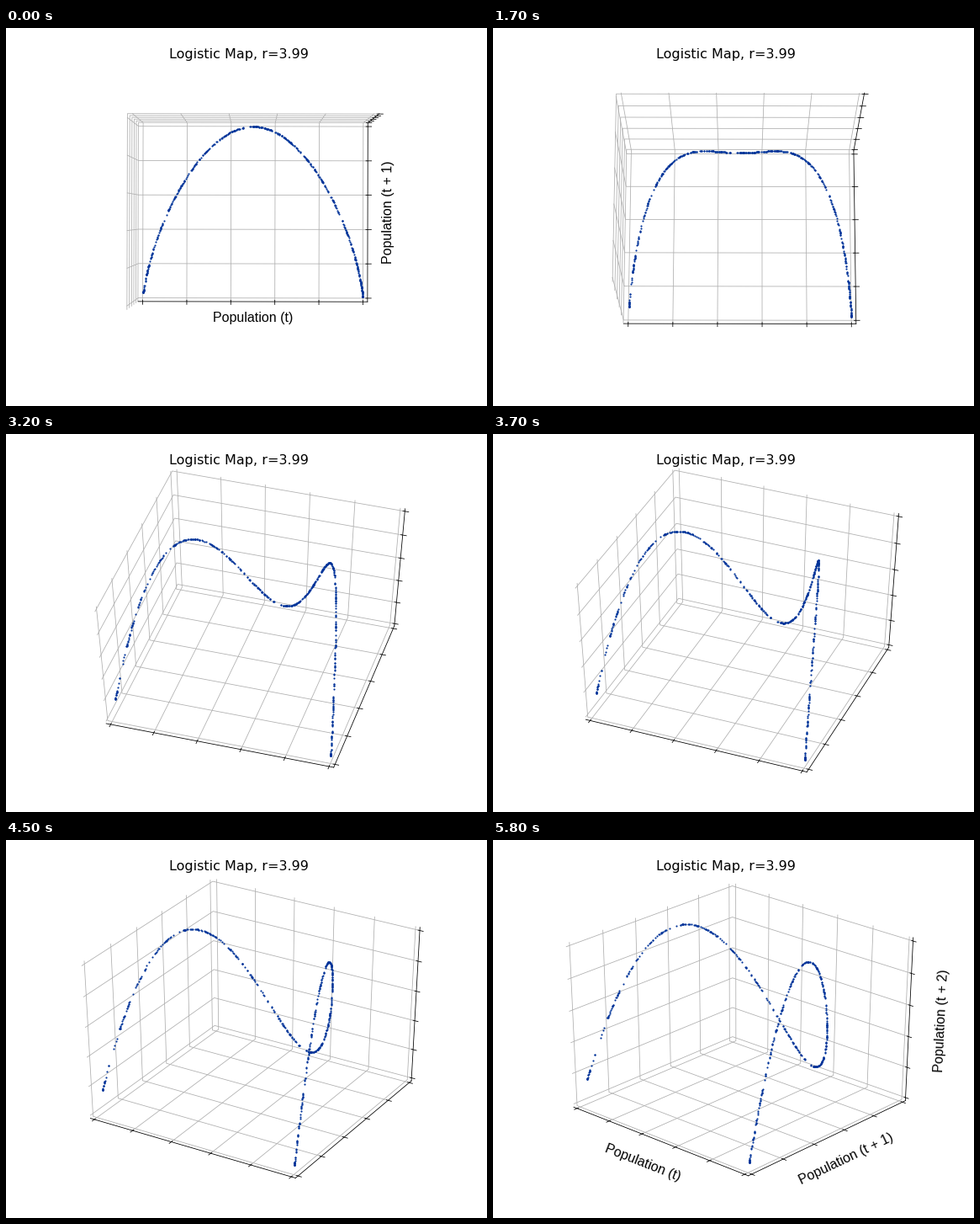
A matplotlib script that plays this animation: 572x449 px, repeating every 5.9 s.

```python
import numpy as np
import matplotlib.pyplot as plt
from matplotlib.animation import FuncAnimation
from matplotlib.collections import LineCollection

W, H, DPI = 572, 449, 72
FRAMES, INTERVAL = 59, 100
RATE, GENS = 3.99, 500
DIST = 11.0
SCALE = np.array([558.0, 434.6]) / 0.185      # pixels per projected unit
CENTER = 7.2 + 0.095 * SCALE

LOW, HIGH = -1 / 48, 1 + 1 / 48               # box slightly larger than the data
STEP = 1 / 12
LABEL_PAD = 0.1007
FAR = np.array([LOW, HIGH, LOW])              # corner shared by the three panes
NEAR = np.array([HIGH, LOW, HIGH])
TICKS = np.linspace(0, 1, 6)

# Each axis: start of its edge, direction its ticks point in
EDGES = [
    (np.array([LOW, LOW, LOW]), np.array([0, 1, 0])),
    (np.array([HIGH, LOW, LOW]), np.array([-1, 0, 0])),
    (np.array([HIGH, HIGH, LOW]), np.array([-1, 0, 0])),
]

# Camera moves: (number of frames, elevation step, azimuth step)
MOVES = [(3, -0.5, 0), (14, -1.0, 0), (24, -1.5, 1.1),
         (4, -1.0, 1.1), (9, -0.5, 1.1), (3, -0.2, 0.5)]


def camera(frame):
    elev, azim = 89.9, 270.1
    for count, d_elev, d_azim in MOVES:
        n = min(frame, count)
        elev += n * d_elev
        azim += n * d_azim
        frame -= n
    return np.radians(elev), np.radians(azim)


def projector(elev, azim):
    ce, se, ca, sa = np.cos(elev), np.sin(elev), np.cos(azim), np.sin(azim)
    right = np.array([-sa, ca, 0])
    up = np.array([-se * ca, -se * sa, ce])
    toward = np.array([ce * ca, ce * sa, se])

    def project(points):
        p = np.asarray(points, float) - 0.5
        depth = DIST - p @ toward
        flat = np.stack([p @ right, p @ up], axis=-1) / depth[..., None]
        return CENTER + SCALE * flat

    return project


def moved(point, axis, value):
    out = point.copy()
    out[axis] = value
    return out


def orbit(pop=0.5):
    pops = [pop]
    for _ in range(GENS - 1):
        pop = pop * RATE * (1 - pop)
        pops.append(pop)
    return np.array(pops)


def grid_lines():
    lines = []
    for axis in range(3):
        a, b = (axis + 1) % 3, (axis + 2) % 3
        for t in TICKS:
            mid = moved(FAR, axis, t)
            lines.append([moved(mid, a, NEAR[a]), mid, moved(mid, b, NEAR[b])])
    return np.array(lines)


def axis_lines():
    lines = []
    for axis, (start, tick_dir) in enumerate(EDGES):
        lines.append([start, moved(start, axis, HIGH)])
        for t in TICKS:
            p = moved(start, axis, t)
            lines.append([p + 0.1 * STEP * tick_dir, p - 0.2 * STEP * tick_dir])
    return np.array(lines)


def label_anchor(axis):
    mid = moved(EDGES[axis][0], axis, 0.5)
    return mid + LABEL_PAD * np.sign(mid - 0.5)


pops = orbit()
points = np.column_stack([pops[:-2], pops[1:-1], pops[2:]])
grid_3d, axes_3d = grid_lines(), axis_lines()

fig = plt.figure(figsize=(W / DPI, H / DPI), dpi=DPI, facecolor="white")
ax = fig.add_axes([0, 0, 1, 1])
ax.set(xlim=(0, W), ylim=(0, H))
ax.axis("off")

grid = LineCollection([], colors="#b0b0b0", linewidths=0.8, zorder=1)
edges = LineCollection([], colors="black", linewidths=0.8, zorder=2,
                       capstyle="projecting")
ax.add_collection(grid)
ax.add_collection(edges)
dots = ax.scatter(points[:, 0], points[:, 1], s=5, marker=".", c="#003399",
                  edgecolors="#003399", linewidths=1, zorder=3)
ax.text(277.2, 413, "Logistic Map, r=3.99", family="DejaVu Sans", size=16,
        ha="center", va="baseline")
labels = [ax.text(0, 0, text, family="Liberation Sans", size=16,
                  ha="center", va="center")
          for text in ("Population (t)", "Population (t + 1)", "Population (t + 2)")]


def place_label(axis, project):
    start = EDGES[axis][0]
    p, q = project([start, moved(start, axis, HIGH)])
    angle = np.degrees(np.arctan2(q[1] - p[1], q[0] - p[0])) % 180
    labels[axis].set_rotation(angle - 180 if angle > 90 else angle)
    labels[axis].set_position(project(label_anchor(axis)))


def update(frame):
    project = projector(*camera(frame))
    grid.set_segments(project(grid_3d))
    edges.set_segments(project(axes_3d))
    dots.set_offsets(project(points))

    # Labels only show while the camera rests
    last = frame == FRAMES - 1
    for axis, shown in enumerate((frame == 0 or last, frame == 0 or last, last)):
        labels[axis].set_visible(shown)
        place_label(axis, project)
    return [grid, edges, dots, *labels]


anim = FuncAnimation(fig, update, frames=FRAMES, init_func=lambda: update(0),
                     interval=INTERVAL, repeat=True, repeat_delay=0, blit=False)
plt.show()
```
